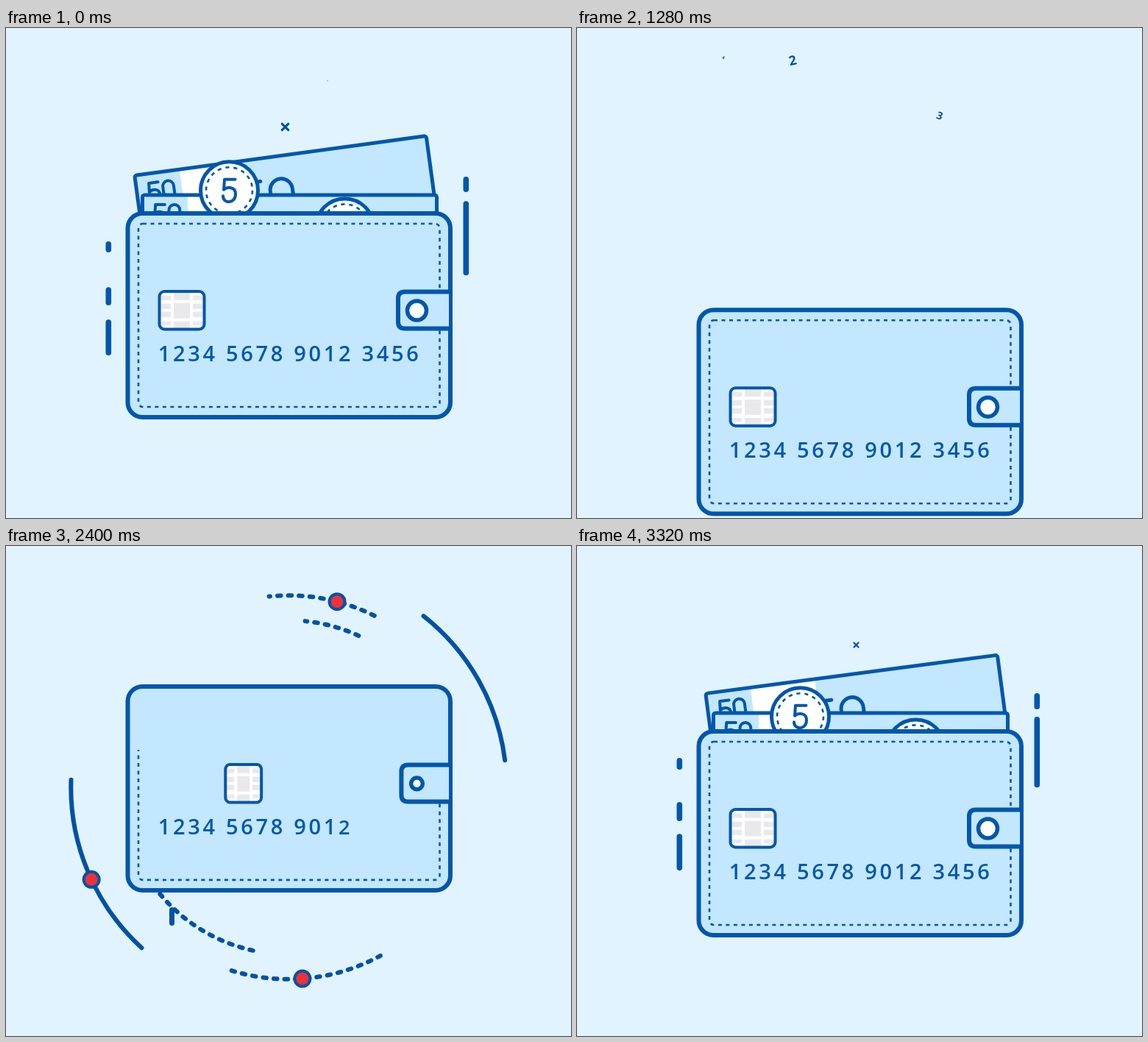
An HTML page for the animation above (3360 ms loop, 768 px wide and 666 px high).

```html
<!DOCTYPE html>
<html lang="en">
<head>
<meta charset="utf-8">
<title>Wallet</title>
<style>
  html, body { margin: 0; width: 100%; height: 100%; overflow: hidden; background: #e1f3ff; }
  svg { display: block; width: 768px; height: 666px; }
  svg * { vector-effect: non-scaling-stroke; }
  .ink { stroke: #0057ab; fill: none; }
  .sky { stroke: #0057ab; fill: #c3e7ff; }
  .white { stroke: #0057ab; fill: #fff; }
  .round { stroke-linecap: round; stroke-linejoin: round; }
  text { font-family: "Open Sans", "Noto Sans", sans-serif; fill: #0057ab; }
  #arcs .ink, #tick, #digits .ink { stroke: #0052a4; }
  #digits text { fill: #0052a4; }
</style>
</head>
<body>
<svg id="stage" viewBox="0 0 768 666">
  <defs>
    <mask id="sewn" maskUnits="userSpaceOnUse" x="160" y="240" width="460" height="300">
      <path id="thread" pathLength="100" fill="none" stroke="#fff" stroke-width="8"
        d="M385 266H583.5a6 6 0 0 1 6 6V509a6 6 0 0 1-6 6H186a6 6 0 0 1-6-6V272a6 6 0 0 1 6-6Z"/>
    </mask>
    <clipPath id="chipShape"><rect x="-30.5" y="-25.7" width="61" height="51.4" rx="7"/></clipPath>
  </defs>
  <g id="arcs"></g>
  <path id="tick" class="ink round" stroke-width="7"/>
  <g id="sides"></g>
  <g id="digits"></g>
  <g id="cash"></g>
  <g id="wallet">
    <rect id="leather" class="sky" x="165.5" y="252" width="438.5" height="277" rx="20" stroke-width="6"/>
    <g mask="url(#sewn)">
      <rect class="ink" x="180" y="266" width="409.5" height="249" rx="6" stroke-width="2.6" stroke-dasharray="5 5.5"/>
    </g>
    <g id="chip"></g>
    <text id="number" x="206.7" y="452.8" font-size="29" font-weight="600" letter-spacing="3.7" xml:space="preserve"><tspan></tspan><tspan></tspan></text>
    <path id="clasp" class="sky" stroke-width="6"/>
    <circle id="button" class="white" cx="558.5" cy="384" stroke-width="5.5"/>
  </g>
</svg>
<script>
const LOOP = 3360, ENTRY = 1880;
const $ = id => document.getElementById(id);
const clamp = (v, lo = 0, hi = 1) => Math.min(hi, Math.max(lo, v));
const show = (el, on) => el.setAttribute('display', on ? 'inline' : 'none');

function add(parent, tag, attrs, html = '') {
  const el = document.createElementNS('http://www.w3.org/2000/svg', tag);
  for (const k in attrs) el.setAttribute(k, attrs[k]);
  el.innerHTML = html;
  parent.appendChild(el);
  return el;
}

// Monotone cubic through [time, value] keys, at rest at both ends.
function track(u, keys) {
  const n = keys.length - 1;
  if (u <= keys[0][0]) return keys[0][1];
  if (u >= keys[n][0]) return keys[n][1];
  const slope = i => (keys[i + 1][1] - keys[i][1]) / (keys[i + 1][0] - keys[i][0]);
  const tangent = i => {
    if (i === 0 || i === n) return 0;
    const a = slope(i - 1), b = slope(i);
    return a * b <= 0 ? 0 : 2 * a * b / (a + b);
  };
  let i = 0;
  while (u > keys[i + 1][0]) i++;
  const [t0, v0] = keys[i], [t1, v1] = keys[i + 1], h = t1 - t0, p = (u - t0) / h;
  const q = p * p * (3 - 2 * p);
  return v0 + (v1 - v0) * q + h * p * (1 - p) * (tangent(i) * (1 - p) - tangent(i + 1) * p);
}
const zip = (times, values) => times.map((t, i) => [t, values[i]]);

// Money
const FIVE = '<path d="M16.5 0H2L1 14C5 10 17 9 17 20C17 33.5 0 33.5 0 22.5"/>';
const fifty = (x, y, s, w) => `<g class="ink round" stroke-width="${w}" transform="translate(${x} ${y}) scale(${s})">
  ${FIVE}<rect x="23" width="17" height="30" rx="8.5"/></g>`;
const note = big => `<rect width="400" height="112" rx="3" fill="#c3e7ff"/>
  <rect x="61.5" width="88" height="112" fill="#fff"/>
  ${fifty(16, 13, .87, 4)}${big ? fifty(139, 31, 1.78, 5) : ''}
  <rect class="ink" width="400" height="112" rx="3" stroke-width="5"/>`;
const COIN = `<circle class="white" r="39" stroke-width="5"/>
  <circle class="ink" r="31.5" stroke-width="2.6" stroke-dasharray="5.2 5.8"/>
  <g class="ink round" stroke-width="4" transform="translate(-8.5 -15)">${FIVE}</g>`;
const cash = $('cash');
const backNote = add(cash, 'g', {}, note(true));
const frontNote = add(cash, 'g', {}, note(false));
const coins = [
  { x: 460.5, keys: [[-360, 325], [-40, 275], [0, 271], [480, 241], [640, 241], [960, 252], [1160, 350]] },
  { x: 303.5, keys: [[-360, 300], [-40, 232], [0, 221], [430, 161], [590, 161], [960, 216], [1160, 340]] }
].map(c => ({ ...c, el: add(cash, 'g', {}, COIN) }));

// Chip
let stripes = '<path d="M-13 -26V26M13 -26V26M-30 -12H30M-30 13H30" stroke-width="4"/>';
for (let y = -22; y < 26; y += 11) stripes += `<path d="M-30 ${y}H-13M13 ${y}H30" stroke-width="3.5"/>`;
$('chip').innerHTML = `<g clip-path="url(#chipShape)"><rect x="-31" y="-26" width="62" height="52" fill="#e9e9eb"/>
  <g stroke="#fff">${stripes}</g></g>
  <rect class="ink" x="-30.5" y="-25.7" width="61" height="51.4" rx="7" stroke-width="4"/>`;

// Orbits around the wallet, in degrees: both ends of the line, and an optional bead
const ORBIT = [-1230, -960, -360, -280], SHORT = [-1230, -960, -430, -400];
const orbits = [
  { r: 296.5, a: [-100, -51.9, 18.4, 28], b: [-100, -7.2, 27.7, 28] },
  { r: 295.7, times: [-1230, -960, -400, -360], a: [92, 132.3, 206, 207.7], b: [92, 181.9, 206, 207.7], bead: [92, 154.8, 207.7, 209], beadTimes: ORBIT },
  { r: 260.8, dash: 1, a: [-35, -95.7, -137.2, -140], b: [-35, -63.3, -136.2, -140], bead: [-35, -75.2, -140.9, -143] },
  { r: 260.8, dash: 1, times: SHORT, a: [150, 61.5, 22, 20], b: [150, 107.4, 24, 20], bead: [150, 86, 22, 20], out: -440 },
  { r: 227, dash: 1, a: [-115, -84.4, -13, -3], b: [-115, -65.3, -3.7, -3] },
  { r: 227, dash: 1, a: [80, 102, 177, 179], b: [80, 140.2, 178.2, 179] }
].map(o => ({
  times: ORBIT, out: -240, ...o,
  line: add($('arcs'), 'path', { class: 'ink round', 'stroke-width': 6, ...(o.dash && { 'stroke-dasharray': '4.6 10' }) })
}));
for (const o of orbits) if (o.bead)
  o.dot = add($('arcs'), 'circle', { fill: '#ee303b', stroke: '#0052a4', 'stroke-width': 4 });

const polar = (r, deg) => {
  const a = deg * Math.PI / 180;
  return [384 + r * Math.cos(a), 328 + r * Math.sin(a)];
};

function drawOrbit(o, u) {
  const a = track(u, zip(o.times, o.a)), b = track(u, zip(o.times, o.b));
  show(o.line, b - a > .3);
  o.line.setAttribute('d', `M${polar(o.r, b)}A${o.r} ${o.r} 0 0 0 ${polar(o.r, a)}`);
  if (!o.dot) return;
  const size = clamp(Math.min((u + 1200) / 140, (o.out - u) / 100));
  const [x, y] = polar(o.r, track(u, zip(o.beadTimes || o.times, o.bead)));
  show(o.dot, size > 0);
  o.dot.setAttribute('cx', x);
  o.dot.setAttribute('cy', y);
  o.dot.setAttribute('r', 10.5 * size);
}

// Falling side lines: top and bottom edges over time
const FALL = [-200, -40, 0, 560, 960];
const sides = [
  { x: 139.3, a: [280, 288, 290, 419, 450], b: [280, 304, 305, 428, 458], out: 1120 },
  { x: 139.3, a: [335, 348, 352, 446, 462], b: [335, 374, 377, 456, 470], out: 920 },
  { x: 139.3, a: [370, 391, 396, 492, 508], b: [370, 441, 445, 504, 516], out: 940 },
  { x: 625.3, a: [190, 200, 202, 387, 458], b: [190, 222, 223, 398, 465], out: 1120 },
  { x: 625.3, a: [220, 232, 235, 435, 506], b: [220, 328, 336, 466, 513], out: 1140 }
].map(s => ({ ...s, el: add($('sides'), 'path', { class: 'ink round' }) }));

function drawSide(s, u) {
  const a = track(u, zip(FALL, s.a)), b = track(u, zip(FALL, s.b));
  const w = Math.min(7.6, b - a) * clamp((s.out - u) / 100);
  show(s.el, w > .2);
  s.el.setAttribute('stroke-width', Math.max(0, w));
  s.el.setAttribute('d', `M${s.x} ${a + w / 2}V${Math.max(a + w / 2 + .01, b - w / 2)}`);
}

// Popping symbols: glyph, x, y, tilt, start, end
const pops = [
  ['×', 379.5, 134.5, 0, -140, 880],
  ['7', 437, 72, -14, -20, 950],
  ['6', 503, 8, 0, 100, 1140],
  ['5', 227, 155, -22, 150, 1190],
  ['4', 199, 40, 20, 360, 1330],
  ['3', 493, 119, 20, 460, 1400],
  ['2', 293, 44, -13, 600, 1430]
].map(([glyph, x, y, tilt, from, to]) => ({
  x, y, tilt, from, to,
  el: add($('digits'), 'g', {}, glyph === '×'
    ? '<path class="ink round" style="vector-effect:none" stroke-width="6.4" d="M-8.3-8.3 8.3 8.3M8.3-8.3-8.3 8.3"/>'
    : `<text text-anchor="middle" y="12" font-size="33.5" font-weight="700">${glyph}</text>`)
}));

function drawPop(p, u) {
  const s = clamp(Math.min((u - p.from) / 280, (p.to - u) / 280));
  show(p.el, s > 0);
  p.el.setAttribute('transform', `translate(${p.x} ${p.y}) rotate(${p.tilt}) scale(${s})`);
}

// Wallet
const NUMBER = '1234 5678 9012 3456';
const [typed, growing] = $('number').children;

function walletShift(u) {
  if (u < -360) return -81.5 + 500 * (1 - clamp((u + 1503.3) / 830)) ** 3;
  return track(u, [[-360, -81.5], [-90, 0], [460, 0], [560, -3], [960, -31.5], [1030, -33],
    [1120, -8], [1280, 130], [1440, 440], [1500, 600]]);
}

function drawWallet(u) {
  $('wallet').setAttribute('transform', `translate(0 ${walletShift(u)})`);
  $('leather').setAttribute('height', track(u, [[-1520, 32], [-1250, 277]]));

  const right = track(u, [[-1250, 0], [-960, 27], [-700, 50]]);
  const left = track(u, [[-1250, 0], [-960, 28.9], [-700, 50]]);
  $('thread').setAttribute('stroke-dasharray', `0 ${50 - right} ${right + left} 100`);

  const chipX = track(u, [[-1200, 385], [-960, 323], [-720, 239]]);
  const chipW = track(u, [[-1200, 0], [-960, .8], [-720, 1]]);
  show($('chip'), chipW > 0);
  $('chip').setAttribute('transform', `translate(${chipX} 383.8) scale(${chipW} 1)`);

  const count = clamp(13.9 + (u + 960) / 27, 0, NUMBER.length), whole = Math.floor(count);
  typed.textContent = NUMBER.slice(0, whole);
  growing.textContent = NUMBER.slice(whole, whole + 1);
  growing.setAttribute('font-size', 29 * (count - whole));

  const edge = track(u, [[-1200, 604], [-960, 537.5], [-860, 533]]);
  show($('clasp'), edge < 590);
  $('clasp').setAttribute('d', `M602 358.5H${edge + 9}q-9 0-9 9V399.5q0 9 9 9H602`);

  const size = track(u, [[-1080, 0], [-960, .6], [-820, 1]]);
  show($('button'), size > 0);
  $('button').setAttribute('r', 13 * size);
}

function drawCash(u) {
  show(cash, u > -360 && u < 1170);
  const y = track(u, [[-360, 235], [-100, 202], [-40, 200.5], [560, 200.5], [960, 209], [1160, 310]]);
  const tilt = track(u, [[-360, 0], [-40, -7.5], [0, -7.74], [560, -7.74], [960, -6], [1160, 0]]);
  const x = track(u, [[560, 174.8], [960, 177]]);
  const front = track(u, [[-360, 255], [-80, 227], [560, 227], [960, 237], [1160, 330]]);
  backNote.setAttribute('transform', `translate(${x} ${y}) rotate(${tilt})`);
  frontNote.setAttribute('transform', `translate(185.5 ${front})`);
  for (const c of coins) c.el.setAttribute('transform', `translate(${c.x} ${track(u, c.keys)})`);
}

function draw(t) {
  const u = t < ENTRY - 40 ? t : t - LOOP;
  orbits.forEach(o => drawOrbit(o, u));
  sides.forEach(s => drawSide(s, u));
  pops.forEach(p => drawPop(p, u));
  drawCash(u);
  drawWallet(u);
  const tick = track(u, [[-1050, 0], [-960, 18], [-870, 0]]);
  show($('tick'), tick > 0);
  $('tick').setAttribute('d', `M225.5 ${512.5 - tick}V512.5`);
}

const start = performance.now();
function frame() {
  draw((performance.now() - start) % LOOP);
  requestAnimationFrame(frame);
}
frame();
</script>
</body>
</html>
```
